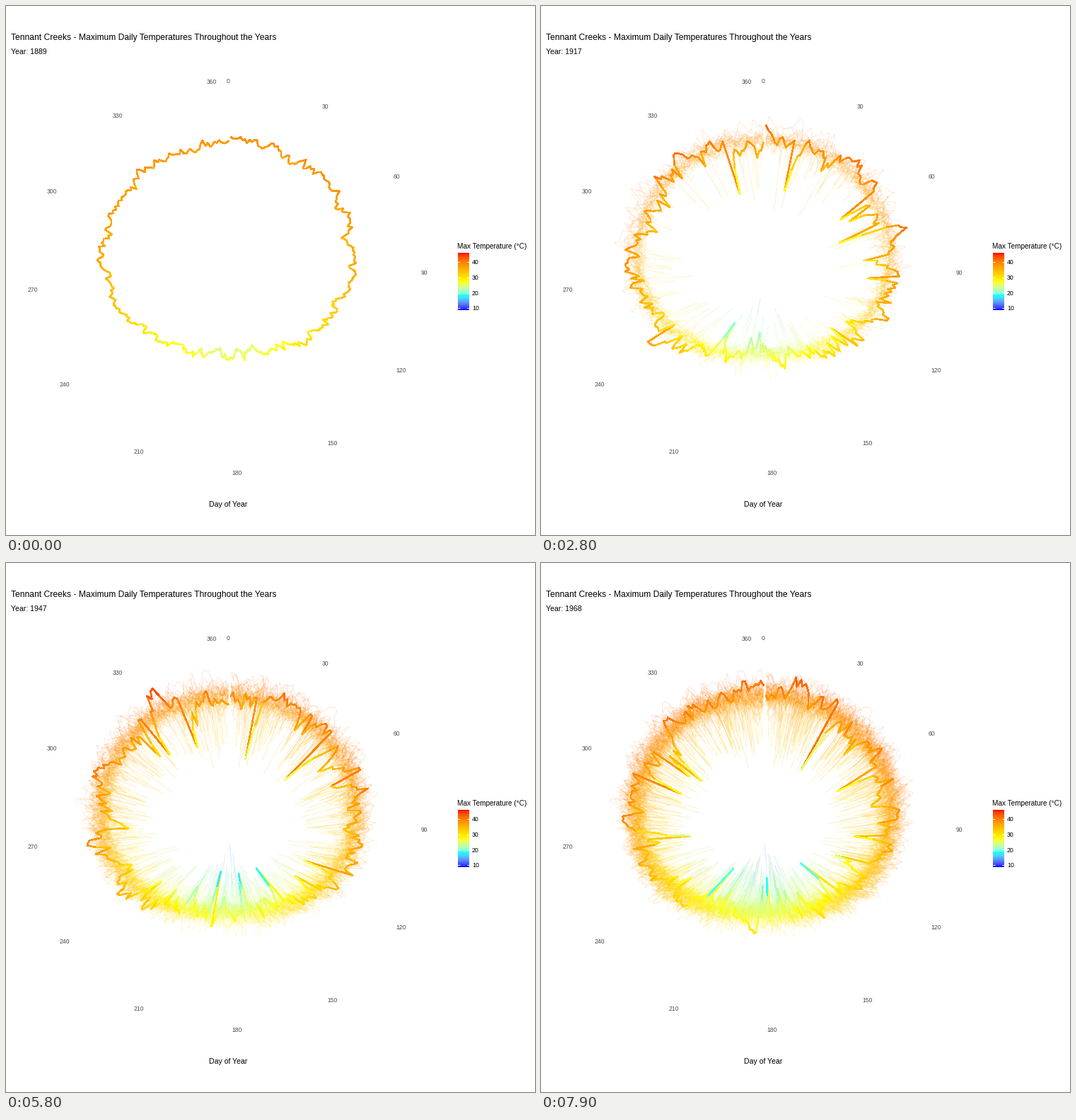
Animation of 748x748 px, one loop 8000 ms. Source, as a matplotlib script:

```python
import numpy as np
import matplotlib.pyplot as plt
from matplotlib.animation import FuncAnimation
from matplotlib.collections import LineCollection

SIZE, DPI = 748, 64
PX = 72 / DPI                      # points per pixel
CX, CY, RADIUS, LABEL_R = 314.5, 383, 246, 277
T_MIN, T_MAX = 8.6, 46
DAYS = 365
FIRST, YEARS = 1889, 80

plt.rcParams["font.family"] = "Liberation Sans"

# sRGB <-> CIE Lab, used for a perceptual colour ramp
TO_XYZ = np.array([[.4124, .3576, .1805], [.2126, .7152, .0722],
                   [.0193, .1192, .9505]])
WHITE = TO_XYZ.sum(axis=1)


def to_lab(rgb):
    rgb = np.asarray(rgb, float)
    lin = np.where(rgb > .04045, ((rgb + .055) / 1.055) ** 2.4, rgb / 12.92)
    v = lin @ TO_XYZ.T / WHITE
    f = np.where(v > .008856, np.cbrt(v), 7.787 * v + 16 / 116)
    x, y, z = f.T
    return np.stack([116 * y - 16, 500 * (x - y), 200 * (y - z)], axis=-1)


def to_rgb(lab):
    light, a, b = lab.T
    y = (light + 16) / 116
    f = np.stack([y + a / 500, y, y - b / 200], axis=-1)
    v = np.where(f > .2069, f ** 3, (f - 16 / 116) / 7.787)
    lin = np.clip((v * WHITE) @ np.linalg.inv(TO_XYZ).T, 0, 1)
    rgb = np.where(lin > .0031308, 1.055 * lin ** (1 / 2.4) - .055, 12.92 * lin)
    return np.clip(rgb, 0, 1)


STOPS = to_lab([(0, 0, 1), (0, 1, 1), (1, 1, 0), (1, 165 / 255, 0), (1, 0, 0)])


def ramp(temp):
    pos = (np.asarray(temp) - T_MIN) / (T_MAX - T_MIN) * (len(STOPS) - 1)
    knots = np.arange(len(STOPS))
    return to_rgb(np.stack([np.interp(pos, knots, c) for c in STOPS.T], axis=-1))


def polar(day, r):
    a = 2 * np.pi * np.asarray(day) / DAYS
    return CX + r * np.sin(a), CY - r * np.cos(a)


def year_temps(year):
    """Seasonal curve plus slow drift, cut by short cool spells."""
    rng = np.random.default_rng(year)
    season = np.cos(2 * np.pi * np.arange(1, DAYS + 1) / DAYS)
    base = 35.1 + 6.5 * season - 3.6 * season ** 2
    if year < 1910:                # sparse early records vary little
        sd, keep, chance, depth, lift = .9, .78, .01, 4.5, .1
    else:
        sd, keep, chance, lift = 1.65, .74, .08, .8
        depth = 12.5 + 2 * season
    shock = sd * np.sqrt(1 - keep ** 2) * rng.normal(size=DAYS)
    rain = (rng.random(DAYS) < chance) * depth * rng.random(DAYS) ** 2
    drift, cool = np.zeros(DAYS), np.zeros(DAYS)
    drift[0] = sd * rng.normal()
    for i in range(1, DAYS):
        drift[i] = keep * drift[i - 1] + shock[i]
        cool[i] = max(.5 * cool[i - 1], rain[i])
    return np.clip(base + lift + drift - cool, T_MIN + 2, base + 6)


def year_line(temp, **style):
    r = (temp - T_MIN) / (T_MAX - T_MIN) * RADIUS
    pts = np.column_stack(polar(np.arange(1, DAYS + 1), r))
    segs = np.stack([pts[:-1], pts[1:]], axis=1)
    line = LineCollection(segs, colors=ramp(temp[:-1]), visible=False, **style)
    ax.add_collection(line, autolim=False)
    return line


def label(x, y, s, size, color="black", ha="left"):
    return ax.text(x, y, s, fontsize=size * PX, color=color, ha=ha, va="baseline")


fig = plt.figure(figsize=(SIZE / DPI, SIZE / DPI), dpi=DPI, facecolor="white")
ax = fig.add_axes([0, 0, 1, 1])

# Colour bar
X0, X1, Y0, Y1 = 639, 655, 349, 430
bar = ramp(np.linspace(T_MAX, T_MIN, Y1 - Y0))[:, None, :]
ax.imshow(bar, extent=(X0, X1, Y1, Y0), aspect="auto", interpolation="nearest")
for t in (10, 20, 30, 40):
    y = Y0 + (T_MAX - t) / (T_MAX - T_MIN) * (Y1 - Y0)
    for x in (X0, X1 - 3):
        ax.plot([x, x + 3], [y, y], color="white", lw=PX, solid_capstyle="butt")
    label(659, y + 3.5, str(t), 8.7)
label(638.5, 343, "Max Temperature (°C)", 10.05)

ax.set_xlim(0, SIZE)
ax.set_ylim(SIZE, 0)
ax.axis("off")

label(7, 48, "Tennant Creeks - Maximum Daily Temperatures Throughout the Years", 12.15)
subtitle = label(7.5, 67.5, "", 10.5)
label(314.5, 708, "Day of Year", 10.5, ha="center")
for d in range(0, 361, 30):
    x, y = polar(d, LABEL_R)
    label(x, y + 3, str(d), 8.6, "#4D4D4D", "center")

temps = [year_temps(FIRST + k) for k in range(YEARS)]
shadows = [year_line(t, linewidths=1.2 * PX, alpha=.13) for t in temps]
lines = [year_line(t, linewidths=1.6 * PX, capstyle="round", antialiaseds=False,
                   zorder=3) for t in temps]


def update(k):
    for i in range(YEARS):
        shadows[i].set_visible(i < k)
        lines[i].set_visible(i == k)
    subtitle.set_text(f"Year: {FIRST + k}")
    return [*shadows, *lines, subtitle]


anim = FuncAnimation(fig, update, frames=YEARS, interval=100, repeat=True,
                     repeat_delay=0, blit=False)
plt.show()
```
